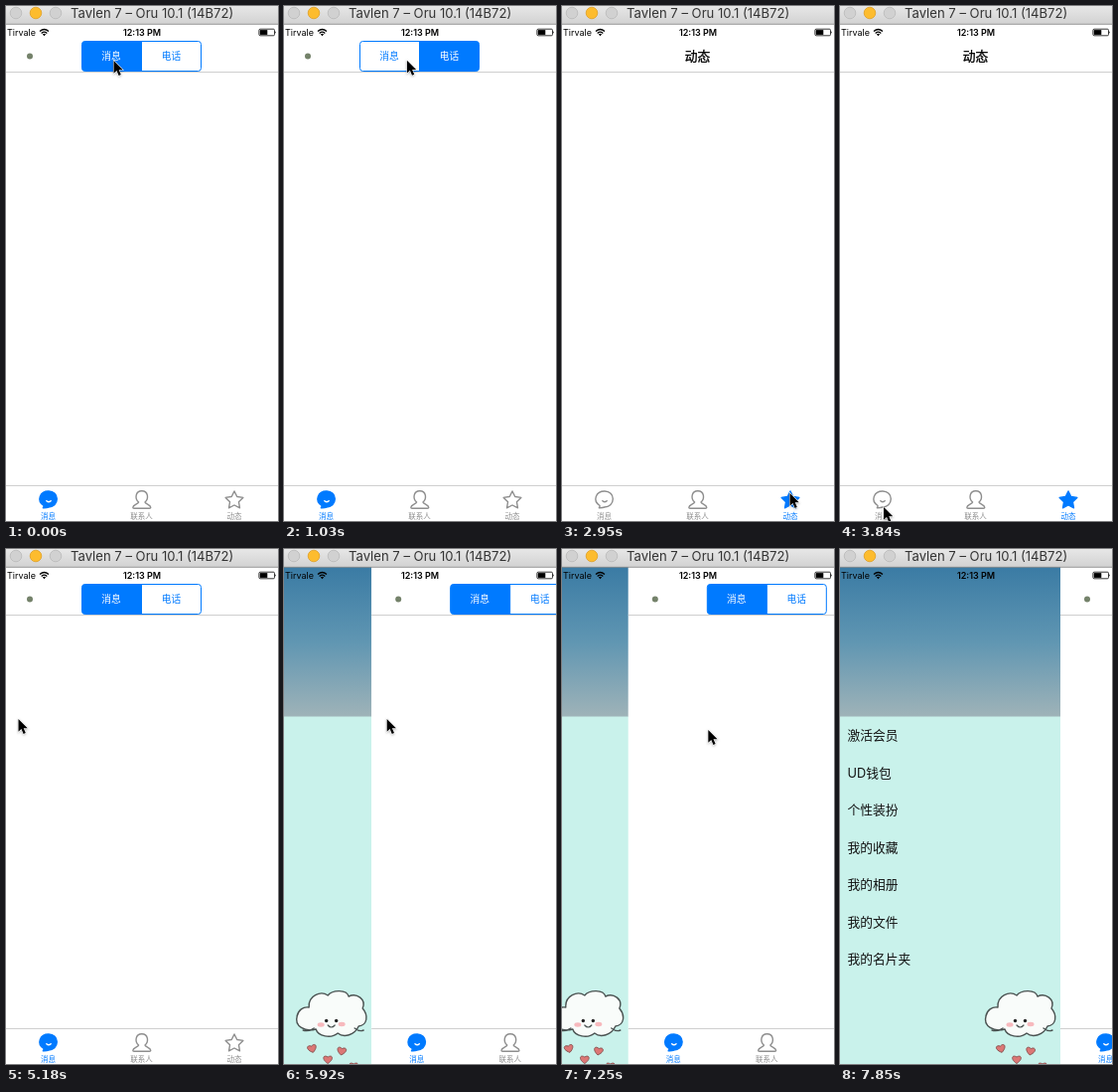
Write an HTML page that moves like this. It is 274 px wide and 518 px high and loops after 8000 ms.

```html
<!DOCTYPE html>
<html lang="zh">
<head>
<meta charset="utf-8">
<title>Drawer menu</title>
<style>
  html, body { margin: 0; width: 100%; height: 100%; overflow: hidden; background: #fff; }
  svg { display: block; width: 274px; height: 518px; }
  text { font-family: Inter, "Noto Sans CJK SC", "Noto Sans CJK", sans-serif; }
  .mid { text-anchor: middle; }
  .tab { color: #8e8e8e; }
  .tab.on { color: #007aff; }
  .tab path { fill: none; stroke: currentColor; stroke-width: 1.4; stroke-linejoin: round; stroke-linecap: round; }
  .tab.on .body { fill: currentColor; }
  .tab.on .smile { stroke: #fff; }
  .tab text { font-size: 7.5px; fill: currentColor; }
  .seg text { font-size: 9.75px; fill: #007aff; }
  .seg rect { fill: none; }
  .seg .on rect { fill: #007aff; }
  .seg .on text { fill: #fff; }
</style>
</head>
<body>
<svg viewBox="0 0 274 518" xmlns="http://www.w3.org/2000/svg">
  <defs>
    <linearGradient id="sky" x2="0" y2="1">
      <stop stop-color="#3a7ba4"/>
      <stop offset=".5" stop-color="#6096b2"/>
      <stop offset="1" stop-color="#9fb3b8"/>
    </linearGradient>
    <linearGradient id="bar" x2="0" y2="1">
      <stop stop-color="#e7e7e7"/>
      <stop offset="1" stop-color="#d2d2d2"/>
    </linearGradient>
    <clipPath id="segClip"><rect x="76.5" y="35.5" width="120" height="30" rx="3"/></clipPath>
    <path id="heart" d="M0 4.5C-7 0-4.5-5 0-2C4.5-5 7 0 0 4.5Z" fill="#dc7775" stroke="#87504f" stroke-width=".9"/>
  </defs>

  <rect width="274" height="518" fill="#fff"/>

  <g id="drawer">
    <rect x="-4" y="18" width="226" height="151" fill="url(#sky)"/>
    <rect x="-4" y="168.5" width="226" height="350" fill="#c9f2eb"/>
    <g id="menu" font-size="12.75" fill="#111"></g>
    <g stroke="#4b5352" stroke-width="1.4" stroke-linecap="round" stroke-linejoin="round" fill="none">
      <path fill="#f9fcfa" d="M159 461C158 449 171 444 178 449C183 443 197 443 199 450C207 446 217 453 213 462C219 469 218 479 209 480C205 489 194 492 188 487C181 493 168 490 166 483C155 486 144 480 147 470C148 464 153 460 159 461Z"/>
      <path d="M153 484Q158 486 164 482M205 482Q210 486 214 484"/>
      <path d="M178 479Q181.500 483 185 479" stroke-width="1.2"/>
    </g>
    <g fill="#f7b9bd">
      <ellipse cx="171" cy="478.500" rx="3.500" ry="2.200"/>
      <ellipse cx="192" cy="478" rx="3.500" ry="2.200"/>
    </g>
    <circle cx="176.500" cy="474.500" r="1.700" fill="#222"/>
    <circle cx="186.500" cy="474.500" r="1.700" fill="#222"/>
    <use href="#heart" transform="translate(162 502) rotate(-15)"/>
    <use href="#heart" transform="translate(192 504.500) rotate(10)"/>
    <use href="#heart" transform="translate(178 513)"/>
    <use href="#heart" transform="translate(204 520)"/>
  </g>

  <g id="page">
    <rect x="-3" y="18" width="281" height="500" fill="#fff"/>
    <path d="M-3 66.500H278M-3 482.500H278" stroke="#cfcfcf"/>
    <g id="home">
      <circle cx="24" cy="50.500" r="3" fill="#74826a"/>
      <g class="seg">
        <g clip-path="url(#segClip)">
          <g id="seg0"><rect x="76" y="35" width="60.500" height="31"/><text class="mid" x="106" y="54">消息</text></g>
          <g id="seg1"><rect x="136.500" y="35" width="61" height="31"/><text class="mid" x="166.500" y="54">电话</text></g>
        </g>
        <rect x="76.500" y="35.500" width="120" height="30" rx="3" stroke="#007aff"/>
        <path d="M136.500 35.500V65.500" stroke="#007aff"/>
      </g>
    </g>
    <text id="title" class="mid" x="136.500" y="55" font-size="12.750" stroke="#000" stroke-width=".35"></text>
    <g class="tab" id="tab0">
      <path class="body" d="M38 502.500C30.500 497.500 34 488 43 488C48 488 51.300 491.600 51.300 495.800C51.300 500.600 47.500 504 43 504C41.500 504.600 39.500 504.900 37.300 504.700C38 504 38.200 503.400 38 502.500Z"/>
      <path class="smile" d="M40.800 497.800Q43 499.800 45.200 497.800"/>
      <text class="mid" x="42.500" y="515.700">消息</text>
    </g>
    <g class="tab" id="tab1">
      <path class="body" d="M133.600 499C129.500 496 130.200 487.700 136.800 487.700C143.400 487.700 144 496 140 499C140.500 501 145.500 501.500 145.800 504.300Q145.800 505.300 144.500 505.300H129Q127.800 505.300 127.800 504.300C128 501.500 133 501 133.600 499Z"/>
      <text class="mid" x="136.500" y="515.700">联系人</text>
    </g>
    <g class="tab" id="tab2">
      <path class="body" id="star"/>
      <text class="mid" x="230" y="515.700">动态</text>
    </g>
  </g>

  <g id="status">
    <text x="1" y="29.500" font-size="9">Tirvale</text>
    <path d="M34 25.500Q38.500 21.500 43 25.500M35.700 27.400Q38.500 25 41.300 27.400" fill="none" stroke="#000" stroke-width="1.300"/>
    <path d="M36.900 28.500Q38.500 27.200 40.100 28.500L38.500 30.200Z"/>
    <text class="mid" x="137" y="29.500" font-size="9" font-weight="600">12:13 PM</text>
    <rect x="254.900" y="23.200" width="15.600" height="6.600" rx="1.200" fill="none" stroke="#000" stroke-width=".8"/>
    <rect x="255.800" y="24.100" width="7.500" height="4.800"/>
    <path d="M271.300 25.300Q272.800 26.500 271.300 27.700Z"/>
  </g>

  <rect width="274" height="18" fill="url(#bar)"/>
  <path d="M0 18.300H274" stroke="#8d8d8d" stroke-width=".9"/>
  <g stroke-width=".8">
    <circle cx="10" cy="7" r="5.800" fill="#d1d1d1" stroke="#b9b9b9"/>
    <circle cx="30" cy="7" r="5.800" fill="#fdbc2e" stroke="#e0a024"/>
    <circle cx="50" cy="7" r="5.800" fill="#d1d1d1" stroke="#b9b9b9"/>
  </g>
  <text x="65" y="12" font-size="13.100" fill="#333">Tavlen 7 – Oru 10.1 (14B72)</text>

  <g id="cursor">
    <path transform="translate(.5 1) scale(.88)" d="M0 0V14.500L3.400 11.400L5.800 17L8.300 16L5.900 10.600H10.500Z" stroke="#fff" stroke-width="1.200" paint-order="stroke" style="filter:drop-shadow(0 1px 1px #0004)"/>
  </g>
</svg>
<script>
const $ = id => document.getElementById(id);
const LOOP = 8000, STEP = 148.1, OPEN = 225;
const TITLES = ["", "联系人", "动态"];

// Pointer legs, timed in screen refreshes; a tap lands one refresh after arrival.
const START = [108, 54];
const LEGS = [
  { from: 0, to: 4, at: [160, 53], tap: { seg: 1 } },
  { from: 6, to: 9, at: START, tap: { seg: 0 } },
  { from: 10, to: 16, at: [146, 487], tap: { tab: 1 } },
  { from: 17, to: 19, at: [229, 489], tap: { tab: 2 } },
  { from: 20, to: 27, at: [43, 503], tap: { tab: 0 } },
  { from: 28, to: 32, at: [12, 170] },
  { from: 37, to: 42.1, at: [167, 170], drag: true },
  { from: 43, to: 46, at: [51, 171], drag: true },
  { from: 46, to: 47, at: [77, 181] },
  { from: 47.2, to: 53, at: [302, 181], drag: true }
];

const easeOut = u => 1 - (1 - u) ** 3;
const clamp = (v, lo, hi) => Math.max(lo, Math.min(hi, v));

// Replays the legs up to step k; a released drawer snaps to the nearer end.
function stateAt(k) {
  const state = { tab: 0, seg: 0, offset: 0, tip: START };
  for (const { from, to, at, tap, drag } of LEGS) {
    if (k < from) break;
    const u = Math.min(1, (k - from) / (to - from));
    const tip = state.tip.map((v, i) => v + (at[i] - v) * (drag ? u : easeOut(u)));
    if (drag) {
      state.offset = clamp(state.offset + tip[0] - state.tip[0], 0, OPEN);
      if (u === 1) state.offset = state.offset > OPEN / 2 ? OPEN : 0;
    }
    if (k >= to + 1) Object.assign(state, tap);
    state.tip = tip;
  }
  return state;
}

const move = (id, x, y = 0) => $(id).setAttribute("transform", `translate(${x} ${y})`);
const choose = (name, count, index) => {
  for (let i = 0; i < count; i++) $(name + i).classList.toggle("on", i === index);
};

["激活会员", "UD钱包", "个性装扮", "我的收藏", "我的相册", "我的文件", "我的名片夹"].forEach((label, i) => {
  const row = document.createElementNS("http://www.w3.org/2000/svg", "text");
  row.setAttribute("x", 7.5);
  row.setAttribute("y", 192 + i * 37.5);
  row.textContent = label;
  $("menu").append(row);
});

$("star").setAttribute("d", "M" + Array.from({ length: 10 }, (_, i) => {
  const r = i % 2 ? 4.7 : 9.3, a = i * Math.PI / 5;
  return `${(230 + r * Math.sin(a)).toFixed(2)} ${(497.3 - r * Math.cos(a)).toFixed(2)}`;
}).join("L") + "Z");

function draw(time) {
  const { tab, seg, offset, tip } = stateAt(Math.floor((time % LOOP + 14) / STEP));
  move("page", offset);
  move("drawer", offset - OPEN);
  move("cursor", ...tip);
  choose("tab", 3, tab);
  choose("seg", 2, seg);
  $("home").style.display = tab ? "none" : "";
  $("title").textContent = TITLES[tab];
}

let start;
function tick(now) {
  start ??= now;
  draw(now - start);
  requestAnimationFrame(tick);
}
draw(0);
requestAnimationFrame(tick);
</script>
</body>
</html>
```
